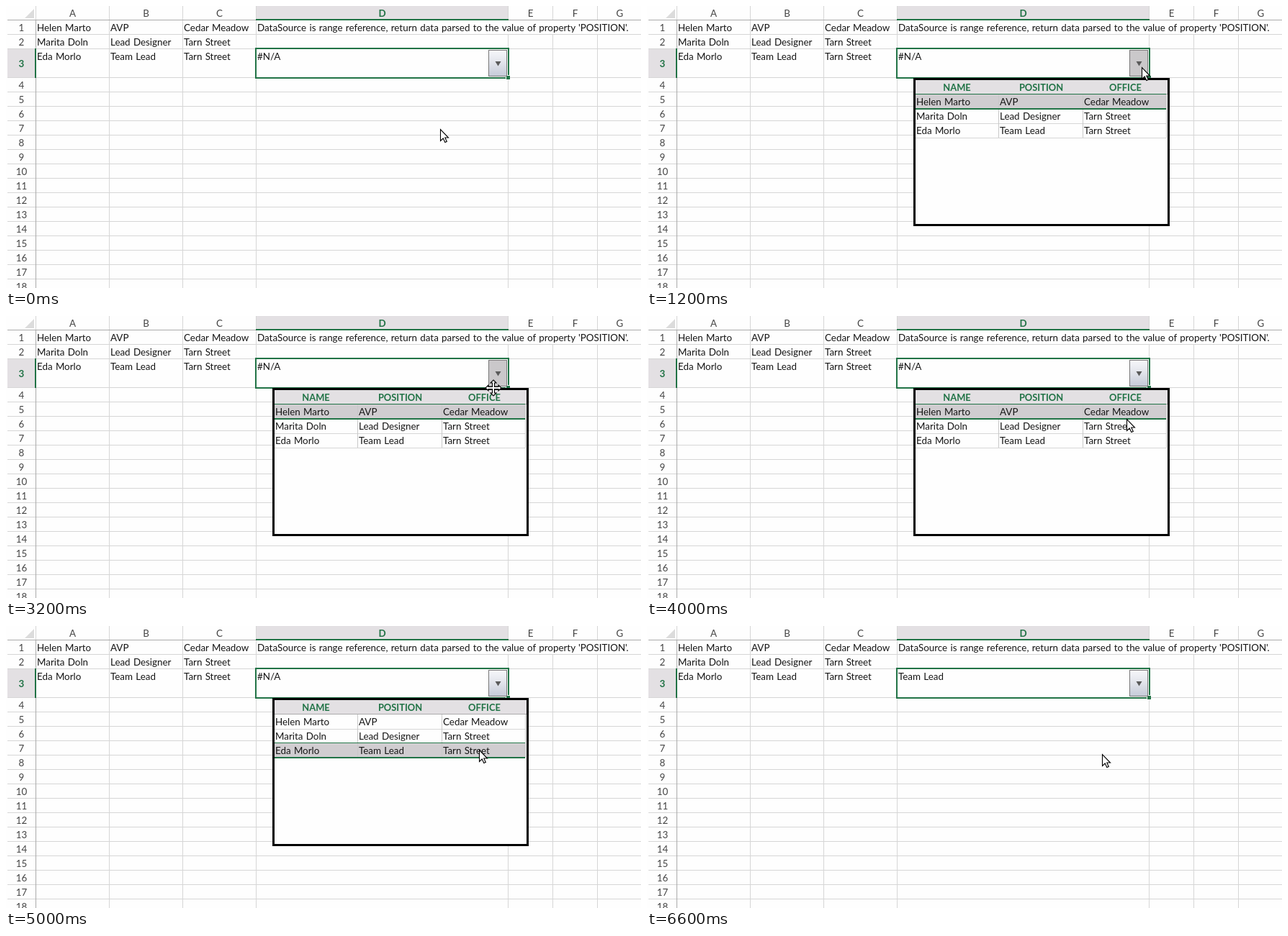
Recreate the animation shown at these times as an HTML page. Size 882 by 392 pixels, loop 6800 ms.

```html
<!DOCTYPE html>
<html lang="en">
<head>
<meta charset="utf-8">
<title>Spreadsheet dropdown</title>
<style>
  html, body { margin: 0; width: 100%; height: 100%; overflow: hidden; background: #fefefe; }
  svg { display: block; width: 100%; height: 100%; }
  rect, .line { shape-rendering: crispEdges; }
  text { font: 13.4px Lato, Carlito, sans-serif; word-spacing: .85px; fill: #161616; }
  .label { fill: #444; text-anchor: middle; }
  .active { fill: #217346; font-weight: 700; }
  .head { fill: #217346; font-weight: 700; font-size: 12.9px; text-anchor: middle; }
  .cursor path { fill: #fff; stroke: #000; stroke-width: 1.1; }
</style>
</head>
<body>
<svg viewBox="0 0 882 392">
  <defs>
    <linearGradient id="face" x2="0" y2="1">
      <stop offset="0" stop-color="#f6f7fa"/>
      <stop offset=".45" stop-color="#e3e5ec"/>
      <stop offset="1" stop-color="#c5cad8"/>
    </linearGradient>
  </defs>
  <g id="sheet"></g>
  <g id="selection"></g>
  <g id="popup"></g>
  <g class="cursor">
    <path id="arrow" d="M.5 .5V16.5L4.2 13L6.8 18.5L9.3 17.4L6.8 12H11.5Z"/>
    <path id="cross" d="M0-11L4-7H1.5V-1.5H7V-4L11 0L7 4V1.5H1.5V7H4L0 11L-4 7H-1.5V1.5H-7V4L-11 0L-7-4V-1.5H-1.5V-7H-4Z"/>
  </g>
</svg>
<script>
const GREEN = '#217346', GRID = '#d6d6d6', EDGE = '#ababab', SHADE = '#e3e0e3';
const LOOP = 6800, STEP = 200;
const byId = id => document.getElementById(id);

function add(parent, tag, attrs, content = '') {
  const node = document.createElementNS('http://www.w3.org/2000/svg', tag);
  for (const key in attrs) node.setAttribute(key, attrs[key]);
  node.textContent = content;
  parent.append(node);
  return node;
}
const box = (parent, x, y, width, height, fill) => add(parent, 'rect', { x, y, width, height, fill });
const label = (parent, x, y, content, cls = '') => add(parent, 'text', { x, y, class: cls }, content);

const people = [
  ['Helen Marto', 'AVP', 'Cedar Meadow'],
  ['Marita Doln', 'Lead Designer', 'Tarn Street'],
  ['Eda Morlo', 'Team Lead', 'Tarn Street']
];

function drawSheet() {
  const sheet = byId('sheet');
  const columns = [41, 143, 245, 347, 697, 759, 821, 883];
  const rowTop = n => n < 4 ? 20 * n - 1 : 20 * n + 19;

  box(sheet, 348, 0, 349, 19, SHADE);
  box(sheet, 2, 60, 39, 39, SHADE);
  add(sheet, 'path', { d: 'M39 4V17H26Z', fill: '#dcdcdc' });

  for (let n = 2; n <= 18; n++) box(sheet, 2, rowTop(n), 880, 1, GRID);
  columns.forEach((x, i) => {
    box(sheet, x, 0, 1, 19, GRID);
    // The long text in the first row spills over the last columns.
    const top = i > 3 ? 39 : 19;
    box(sheet, x, top, 1, 392 - top, GRID);
  });
  box(sheet, 2, 19, 880, 1, EDGE);
  box(sheet, 41, 19, 1, 373, EDGE);
  box(sheet, 347, 18, 351, 2, GREEN);
  box(sheet, 40, 59, 2, 41, GREEN);

  [...'ABCDEFG'].forEach((letter, i) => {
    const middle = (columns[i] + columns[i + 1]) / 2 + .5;
    label(sheet, middle, 15, letter, letter === 'D' ? 'label active' : 'label');
  });
  for (let n = 1; n <= 18; n++) {
    const middle = (rowTop(n) + rowTop(n + 1)) / 2;
    label(sheet, 21.5, middle + 6, n, n === 3 ? 'label active' : 'label');
  }
  people.forEach((person, r) =>
    person.forEach((value, c) => label(sheet, columns[c] + 2, 35 + 20 * r, value)));
  label(sheet, 349, 35, "DataSource is range reference, return data parsed to the value of property 'POSITION'.");
}

function drawSelection() {
  const group = byId('selection');
  add(group, 'rect', { x: 347, y: 59, width: 351, height: 41, fill: '#fefefe', stroke: GREEN, 'stroke-width': 2 });
  box(group, 694, 96, 6, 6, '#fff');
  box(group, 695, 97, 5, 5, GREEN);
  const button = add(group, 'rect', { x: 670.5, y: 61.5, width: 25, height: 36, stroke: '#777' });
  add(group, 'path', { d: 'M679.5 77H687.5L683.5 83.5Z', fill: '#5a5a5a' });
  return { button, value: label(group, 349, 75, '') };
}

function drawPopup() {
  const popup = byId('popup');
  box(popup, 370, 100, 356, 206, '#000');
  box(popup, 373, 103, 350, 200, '#fefefe');
  box(popup, 373, 103, 350, 19, SHADE);
  box(popup, 373, 122, 350, 1, EDGE);
  ['NAME', 'POSITION', 'OFFICE'].forEach((title, i) => label(popup, 430.5 + 117 * i, 118, title, 'head'));

  const marker = add(popup, 'g', {});
  box(marker, 373, 123, 348, 20, '#d0cdd0');
  for (let n = 1; n <= 3; n++) box(popup, 373, 123 + 20 * n, 348, 1, GRID);
  for (const x of [488, 605, 721]) box(popup, x, 123, 1, 60, '#c9c9c9');
  const frame = add(popup, 'g', {});
  box(frame, 373, 122, 348, 1, GREEN);
  box(frame, 373, 142, 348, 2, GREEN);

  people.forEach((person, r) =>
    person.forEach((value, c) => label(popup, [374, 490, 607][c], 138 + 20 * r, value)));
  return { popup, marker, frame };
}

// Pointer stops: time, x, y
const path = [
  [0, 603, 171], [200, 624, 150], [400, 652, 120], [600, 681, 91], [800, 687, 85],
  [1800, 687, 85], [3000, 679, 90], [3200, 677, 100], [3400, 673, 113], [4000, 666, 143],
  [5000, 657, 172], [5200, 656, 171], [6000, 656, 171], [6200, 650, 173], [6600, 632, 178]
];

function pointerAt(time) {
  const next = path.findIndex(stop => stop[0] > time);
  if (next < 0) return path[path.length - 1].slice(1);
  const [t0, x0, y0] = path[next - 1], [t1, x1, y1] = path[next];
  const k = (time - t0) / (t1 - t0);
  return [Math.round(x0 + (x1 - x0) * k), Math.round(y0 + (y1 - y0) * k)];
}

drawSheet();
const { button, value } = drawSelection();
const { popup, marker, frame } = drawPopup();
const arrow = byId('arrow'), cross = byId('cross');
const show = (node, on) => node.setAttribute('visibility', on ? 'visible' : 'hidden');
const start = performance.now();

function render(now) {
  const elapsed = Math.max(0, now - start) % LOOP;
  const time = Math.floor(elapsed / STEP) * STEP;
  const within = (from, to) => time >= from && time < to;

  const moving = within(3200, 3400) || within(5200, 6200);
  const [x, y] = pointerAt(time);
  for (const pointer of [arrow, cross]) pointer.setAttribute('transform', `translate(${x} ${y})`);
  show(arrow, !moving);
  show(cross, moving);

  show(popup, within(1200, 5200));
  const shift = `translate(0 ${time >= 5000 ? 40 : 0})`;
  marker.setAttribute('transform', shift);
  frame.setAttribute('transform', shift);

  button.setAttribute('fill', within(600, 3400) ? '#cac8ca' : 'url(#face)');
  value.textContent = time >= 5200 ? 'Team Lead' : '#N/A';
  requestAnimationFrame(render);
}
render(start);
</script>
</body>
</html>
```
